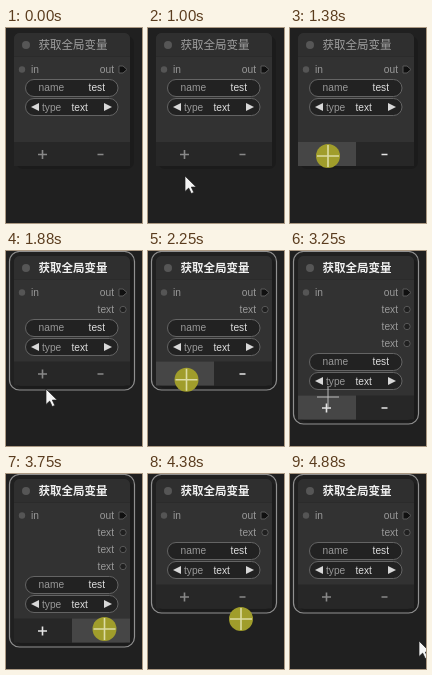
An HTML page that plays this animation: 136x195 px, repeating every 5.38 s.

```html
<!DOCTYPE html>
<html lang="zh">
<head>
<meta charset="utf-8">
<style>
html, body { margin: 0; width: 100%; height: 100%; overflow: hidden; background: #202020; }
svg { display: block; width: 136px; height: 195px; }
text { font: 10.2px "Liberation Sans", Arial, sans-serif; fill: #999; }
.title { font: 11.5px "Noto Sans CJK SC", "Noto Sans CJK", sans-serif; }
.end { text-anchor: end; }
.value { fill: #ddd; }
.pill { fill: #222; stroke: #646464; }
.port { fill: #202020; stroke: #585858; }
</style>
</head>
<body>
<svg viewBox="0 0 136 195">
  <rect width="136" height="195" fill="#202020"/>
  <rect id="shadow" x="10" y="8" width="118" rx="7" fill="#1b1b1b"/>
  <rect id="body" x="8" y="5" width="116" rx="6" fill="#323232"/>
  <path d="M8 28V11a6 6 0 0 1 6-6H118a6 6 0 0 1 6 6V28z" fill="#2f2f2f"/>
  <path d="M8 28.5H124" stroke="#2b2b2b"/>
  <circle cx="20" cy="17" r="4" fill="#565656"/>
  <text id="title" class="title" x="32.4" y="21">获取全局变量</text>
  <circle cx="16" cy="41.5" r="3.2" fill="#555"/>
  <text x="25" y="45">in</text>
  <text class="end" x="108" y="45">out</text>
  <path class="port" style="fill:#101010" d="M113 38H117L121 41.5 117 45H113z"/>
  <g id="outputs"></g>
  <g id="widgets">
    <rect class="pill" x="19.5" y="51.5" width="92.5" height="17" rx="8.5"/>
    <text x="32.6" y="63">name</text>
    <text class="value end" x="99" y="63">test</text>
    <rect class="pill" x="19.5" y="70.5" width="92.5" height="17" rx="8.5"/>
    <path d="M33 75V83L25 79zM98 75V83L106 79z" fill="#d8d8d8"/>
    <text x="36" y="82.5">type</text>
    <text class="value" x="65.5" y="82.5">text</text>
  </g>
  <g id="strip">
    <rect x="8" width="116" y="-12" height="24" fill="#272727"/>
    <rect id="lit" y="-12" width="58" height="24" fill="#464646"/>
    <path id="signs" d="M32 0.5H41M36.5 -4V5M91.5 0.5H97.5" fill="none" stroke-width="1.6"/>
  </g>
  <rect id="outline" x="3.5" y="0.5" width="125" rx="10" fill="none" stroke="#909090" stroke-width="1.2"/>
  <path id="arrow" d="M0 0V15.5L3.7 12.1 6.3 17.6 8.8 16.4 6.3 11.1H11.2z" fill="#f4f4f4" stroke="#222" stroke-width=".7"/>
  <g id="cross">
    <circle id="press" r="12" fill="#a09d2b"/>
    <path id="hair" d="M-11 0H11M0 -11V11"/>
  </g>
</svg>
<script>
const LOOP = 5380, ROW = 17;
const el = id => document.getElementById(id);
const set = (id, attrs) => {
  for (const name in attrs) el(id).setAttribute(name, attrs[name]);
};
const show = (id, on) => set(id, { visibility: on ? 'visible' : 'hidden' });
const move = (id, x, y) => set(id, { transform: `translate(${x} ${y})` });
const within = (n, a, b) => n >= a && n <= b;

for (let i = 0; i < 3; i++) {
  const y = 59 + i * ROW;
  el('outputs').insertAdjacentHTML('beforeend',
    `<g><text class="end" x="108" y="${y + 3}">text</text><circle class="port" cx="117" cy="${y - 0.5}" r="3.2"/></g>`);
}

// Pointer path: step, x, y
const path = [
  [4, 58, 190], [8, 37, 148], [11, 38, 128], [13, 38, 128], [15, 40, 138],
  [17, 38, 128], [19, 39, 129.5], [22, 39, 129.5], [24, 38, 137], [26, 38, 146],
  [30, 98.5, 155], [32, 98.5, 153], [34, 93, 145], [37, 93, 145], [39, 129, 167]
];

function pointer(step) {
  const last = path.length - 1;
  if (step >= path[last][0]) return path[last].slice(1);
  const i = Math.max(0, path.findIndex(p => p[0] > step) - 1);
  const [s, x, y] = path[i], [e, u, v] = path[i + 1];
  const k = Math.max(0, (step - s) / (e - s)), ease = k * k * (3 - 2 * k);
  return [x + (u - x) * ease, y + (v - y) * ease];
}

// Each click adds or removes an output
const clicks = [[12, 1], [19, 1], [25, 1], [32, -1], [34, -1]];
const presses = [[11, 12], [18, 19], [24, 25], [30, 31], [34, 35]];

function draw(ms) {
  const t = ms % LOOP;
  const step = Math.floor(t / 250) * 2 + (t % 250 >= 130 ? 1 : 0);
  const count = clicks.reduce((n, [at, d]) => n + (step >= at ? d : 0), 0);
  const selected = step >= 12;
  const [x, y] = pointer(step);
  const pressed = presses.some(([a, b]) => within(step, a, b));
  const mid = count ? 105.5 + count * ROW : 126;
  const hover = step >= 4 && Math.abs(y - mid) <= 12 && within(x, 8, 124);
  const crossed = hover || pressed || within(step, 34, 37);

  set('body', { height: mid + 7 });
  set('shadow', { height: mid + 7 });
  set('outline', { height: mid + 16 });
  show('outline', selected);
  el('title').style.fill = selected ? '#f0f0f0' : '#a0a0a0';
  el('title').style.fontWeight = selected ? 700 : 400;
  [...el('outputs').children].forEach((g, i) =>
    g.setAttribute('visibility', i < count ? 'visible' : 'hidden'));
  move('widgets', 0, count * ROW);
  move('strip', 0, mid);
  set('lit', { x: x < 66 ? 8 : 66 });
  show('lit', hover);
  set('signs', { stroke: hover ? '#e4e4e4' : '#888' });

  move('arrow', x, y);
  move('cross', x, y);
  show('arrow', step >= 4 && !crossed);
  show('press', pressed);
  show('hair', crossed);
  set('hair', { stroke: pressed ? '#dcdca4' : '#bbb', 'stroke-width': pressed ? 1.6 : 1 });
}

const start = performance.now();
function tick() {
  draw(performance.now() - start);
  requestAnimationFrame(tick);
}
tick();
</script>
</body>
</html>
```
